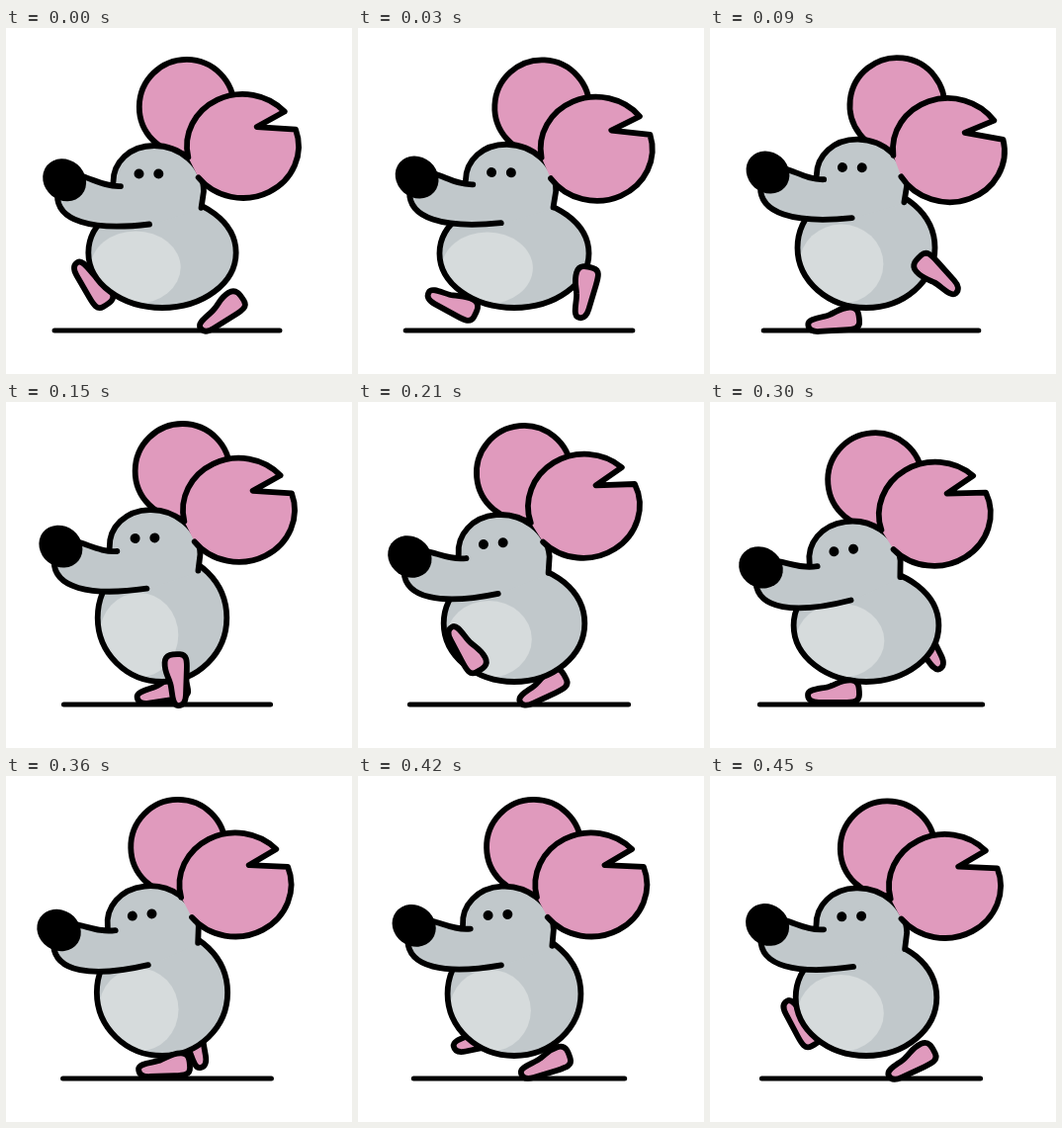
These frames come from a looping animation (350x350 px, 480 ms). An HTML page:

```html
<!DOCTYPE html>
<html lang="en">
<head>
<meta charset="utf-8">
<title>Running mouse</title>
<style>
  html, body { margin: 0; width: 100%; height: 100%; overflow: hidden; background: #fff; }
  svg { display: block; width: 100vw; height: 100vh; }
  .line { fill: none; stroke: #000; stroke-width: 5.8; stroke-linecap: round; stroke-linejoin: round; vector-effect: non-scaling-stroke; }
  .pink { fill: #e09abd; }
  .gray { fill: #c1c8cb; }
  .pale { fill: #d6dbdc; }
</style>
</head>
<body>
<svg viewBox="0 0 350 350">
  <defs>
    <clipPath id="round"><circle r="1"/></clipPath>
    <path id="foot" class="line pink" d="M-26 3C-26-4-10-3-3-6C5-9 8-12 17-12C26-12 26-4 26 3C26 10 20 10.5 10 10.5H-15C-22 10.5-26 8-26 3Z"/>
  </defs>
  <path id="ground" class="line" style="stroke-width:5"/>
  <!-- head and ears are placed around the point between the eyes -->
  <g id="farEar"><circle class="line pink" cx="37.7" cy="-68" r="47.9"/></g>
  <use id="farFoot" href="#foot"/>
  <g id="body">
    <circle class="gray" r="1"/>
    <ellipse class="pale" cx="-.36" cy=".27" rx=".61" ry=".66" clip-path="url(#round)"/>
    <circle class="line" r="1"/>
  </g>
  <use id="nearFoot" href="#foot"/>
  <g id="head">
    <path class="gray" d="M-36 7.5C-36-12-19-28.5 5.5-28.5C31-28.5 55.5-9 55.5 18L53 36L.5 52C-59 58-93.5 47-92.5 20.5L-66.5 2.5Q-50 12-36 12.5Z"/>
    <path class="line" d="M-36 8.5C-36-12-19-28.5 5.5-28.5C31-28.5 55.5-9 55.5 18L53 34.5M-66.5 2.5C-55 6-44 13-28.5 12.5M-92.5 20.5C-93.5 47-59 58 .5 51"/>
    <ellipse cx="-85.3" cy="6" rx="23" ry="20.4" transform="rotate(40 -85.3 6)"/>
    <circle cx="-9.9" r="5"/>
    <circle cx="9.9" r="5"/>
  </g>
  <g id="nearEar">
    <path class="line pink" transform="translate(94.8 -29) scale(56.5 52.5)"
      d="M-.974 .225A1 1 0 0 1 .743-.669L.25-.37L.946-.326A1 1 0 0 1-.788 .616"/>
  </g>
</svg>
<script>
const LOOP = 480, STEP = 30;
const set = (id, name, value) => document.getElementById(id).setAttribute(name, value);
const place = (id, x, y, turn) => set(id, 'transform', `translate(${x} ${y}) rotate(${turn})`);

// Cosine with a given number of beats per loop
const wave = (mid, amp, beats, lag) => t =>
  mid + amp * Math.cos((t / LOOP * beats * 360 - lag) * Math.PI / 180);

// Smooth looping curve through rows of [time, ...values]
function glide(rows) {
  const n = rows.length;
  const at = i => {
    const [time, ...vals] = rows[(i + n) % n];
    return [time + Math.floor(i / n) * LOOP, ...vals];
  };
  return time => {
    const t = time % LOOP;
    const i = rows.findLastIndex(row => row[0] <= t);
    const [a, b, c, d] = [i - 1, i, i + 1, i + 2].map(at);
    const h = c[0] - b[0], u = (t - b[0]) / h, v = 1 - u;
    return b.slice(1).map((p, k) => {
      const q = c[++k];
      const m0 = (q - a[k]) / (c[0] - a[0]) * h, m1 = (d[k] - p) / (d[0] - b[0]) * h;
      return p * v * v * (1 + 2 * u) + m0 * u * v * v + q * u * u * (3 - 2 * u) - m1 * u * u * v;
    });
  };
}

const girth = wave(70.4, 5.2, 2, 35);
const headX = wave(140, 5, 1, 28);
const headTurn = wave(-3.3, 4.4, 1, 45);

// time, head height, ear swing
const bob = glide([
  [0, 147.5, 0.5], [90, 141.1, 6.8], [150, 137.7, 0.3], [210, 143.1, -5.5],
  [300, 150, -4.8], [360, 140.5, -1], [450, 142, -1]
]);

// time, x, y, turn: push off, kick back, pass under, reach, land, slide back
const stride = glide([
  [0, 217, 287, -32], [60, 235, 248, -116], [90, 229, 251, -132], [120, 206, 270, -100],
  [150, 172, 281, -88], [210, 110, 249, 62], [240, 105, 258, 60],
  [300, 125, 293.3, 0], [360, 160, 293, -2], [450, 203, 289, -25]
]);

function draw(t) {
  const rx = girth(t), ry = 55 + (75.5 - rx) * 0.95;
  set('body', 'transform', `translate(158 ${283 - ry}) scale(${rx} ${ry})`);
  set('ground', 'd', `M${163 - rx - 39.3} 306H${163 + rx + 39.3}`);

  const x = headX(t), [y, swing] = bob(t);
  place('head', x, y, headTurn(t));
  place('nearEar', x, y, swing);
  place('farEar', x, y, swing);

  const [fx, fy, turn] = stride(t + LOOP / 2);
  place('nearFoot', ...stride(t));
  place('farFoot', fx - 17, fy, turn);
}

const start = performance.now();
function tick() {
  draw(Math.floor((performance.now() - start) / STEP) * STEP % LOOP);
  requestAnimationFrame(tick);
}
tick();
</script>
</body>
</html>
```
